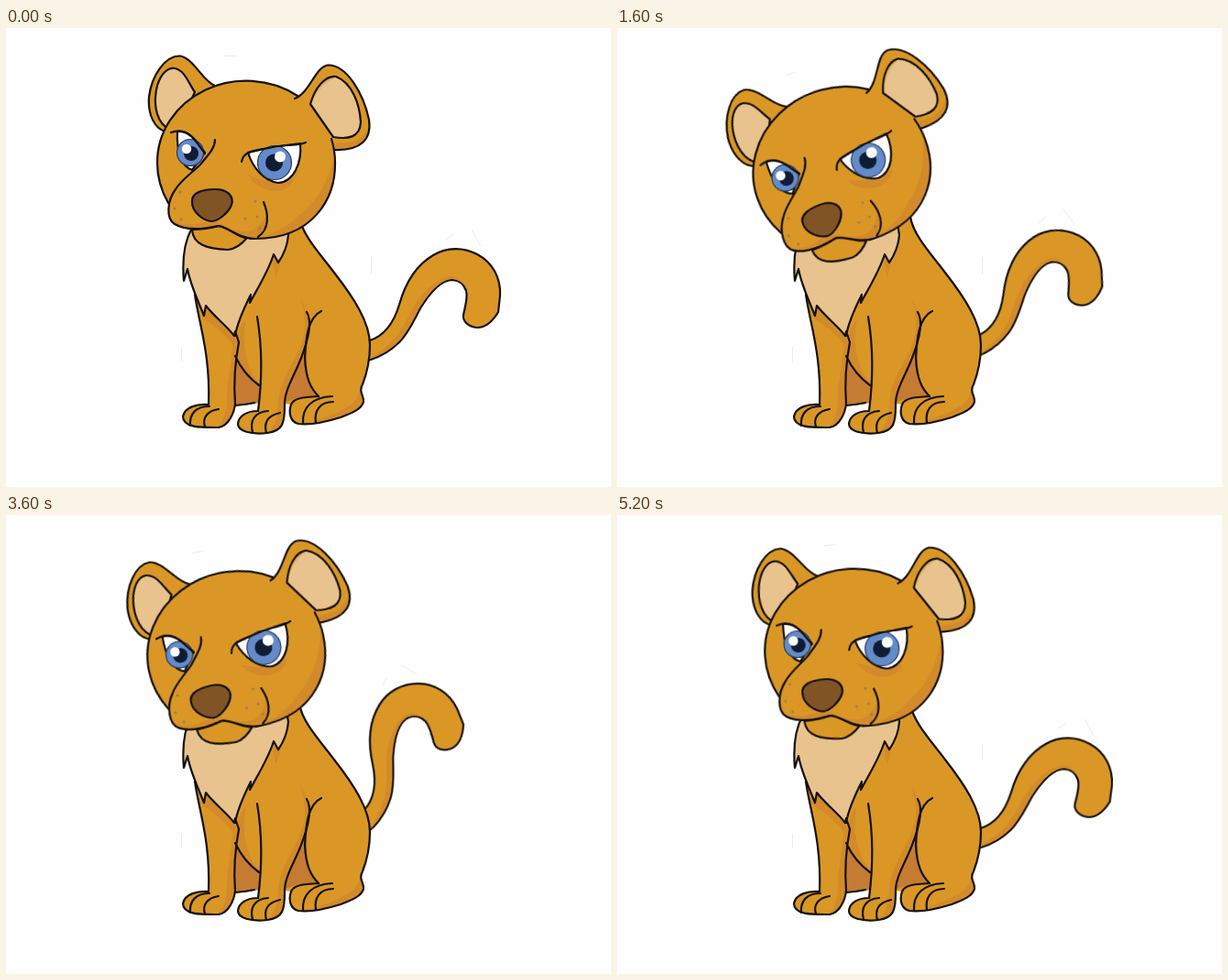
Write an HTML page that moves like this. It is 660x501 px and loops after 5400 ms.

```html
<!DOCTYPE html>
<html lang="en">
<head>
<meta charset="utf-8">
<title>Lion cub</title>
<style>
  html, body { margin: 0; width: 100%; height: 100%; overflow: hidden; background: #fefefe; }
  svg { display: block; width: 660px; height: 501px; }
  .line, .edge { stroke: #14110c; stroke-width: 2.2; stroke-linecap: round; stroke-linejoin: round; }
  .line { fill: none; }
  .coat { fill: #da9726; }
  .shade { fill: #d38a2a; }
  .deep { fill: #c67b33; }
  .cream { fill: #e8c38d; }
  .white { fill: #fefefe; }
  .iris { fill: #648bc9; stroke: #253a5c; stroke-width: 1.2; }
  .pupil { fill: #101c34; }
  .scrap { fill: none; stroke: #e2e2e2; stroke-width: .7; }
  #head { transform-origin: 275px 202px; animation: nod 5400ms infinite; }
  #tail { transform-origin: 356.5px 344.6px; animation: wag 5400ms infinite; }

  /* The pose changes every 200 ms, so each stretch is stepped. */
  @keyframes nod {
    0%      { transform: rotate(0deg);      animation-timing-function: steps(6); }
    22.222% { transform: rotate(-14.1deg);  animation-timing-function: steps(3); }
    33.333% { transform: rotate(-21.4deg);  animation-timing-function: steps(2); }
    40.74%  { transform: rotate(-18.9deg);  animation-timing-function: steps(4); }
    55.555% { transform: rotate(-14.3deg);  animation-timing-function: steps(3); }
    66.666% { transform: rotate(-11.8deg);  animation-timing-function: steps(4); }
    81.481% { transform: rotate(-7.3deg);   animation-timing-function: steps(4); }
    96.296% { transform: rotate(-3.9deg);   animation-timing-function: steps(1); }
    100%    { transform: rotate(0deg); }
  }
  @keyframes wag {
    0%      { transform: rotate(0deg);      animation-timing-function: steps(6); }
    22.222% { transform: rotate(-4.6deg);   animation-timing-function: steps(5); }
    40.74%  { transform: rotate(-15.6deg);  animation-timing-function: steps(1); }
    44.444% { transform: rotate(-17.6deg);  animation-timing-function: steps(3); }
    55.555% { transform: rotate(-30.4deg);  animation-timing-function: steps(1); }
    59.259% { transform: rotate(-33deg);    animation-timing-function: steps(2); }
    66.666% { transform: rotate(-28.3deg);  animation-timing-function: steps(4); }
    81.481% { transform: rotate(-.3deg);    animation-timing-function: steps(2); }
    88.888%, 96.296% { transform: rotate(1deg); animation-timing-function: steps(1); }
    100%    { transform: rotate(0deg); }
  }
</style>
</head>
<body>
<svg viewBox="0 0 660 501">
  <path class="scrap" d="M191.5 348V364M398.5 250V268"/>

  <g id="tail">
    <path class="scrap" d="M508 220L518 238M479 231L488 225"/>
    <path class="coat edge" d="M380 346L397 341C412 336 423 322 429 302C436 277 449 258 466 248C481 239 499 239 514 247C531 256 540 273 539 292L537 310C531 320 523 327 514 327C504 326 498 320 499 313C501 303 504 295 502 287C499 278 493 275 486 275C472 276 460 293 452 306C444 321 439 333 429 343C421 351 410 358 398 362L380 366"/>
    <path class="shade" d="M399 358C419 348 430 333 439 315C449 294 464 277 483 271C491 270 497 273 500 281C496 276 491 274 486 274C472 275 459 292 451 305C443 320 438 332 428 342C420 350 410 357 399 360Z"/>
  </g>

  <g id="body">
    <path class="coat" d="M206 220L320 206C323 226 343 247 358 267C379 294 397 321 397 346C397 362 394 376 389 389C384 397 391 402 390 408C388 416 378 420 365 425C349 430 333 434 319 432C310 430 308 420 311 411L304 410C303 431 302 440 285 442C267 444 253 440 253 432C254 423 263 418 275 418L276 409L250 412C247 424 244 436 232 436C215 437 193 437 193 424C195 414 208 410 221 411C223 370 214 330 206 291Z"/>
    <path class="deep" d="M250 359C257 373 265 382 278 390L276 409Q262 413 249 412Q249 385 250 359Z"/>
    <path class="deep" d="M329 342C327 368 328 390 341 402L320 403L305 408C305 397 318 375 329 342Z"/>
    <path class="shade" d="M262 318C251 330 250 346 251 359C257 373 265 382 278 390C262 372 256 345 262 318Z"/>
    <path class="shade" d="M320 293C326 304 330 313 331 322C330 344 307 386 304 410C304 426 302 440 285 442Q297 432 297 409C298 380 323 357 326 330Q327 309 320 293Z"/>
    <path class="shade" d="M252 342C248 370 249 390 250 411C247 426 243 436 231 436Q241 425 241 405C242 378 247 365 248 338Z"/>
    <path class="shade" d="M291 250L299 258L295 272Q292 267 291 250Z"/>
    <path class="shade" d="M389 389C384 397 391 402 390 408C388 416 378 420 365 425Q341 432 319 432Q350 427 372 414Q386 407 386 392Z"/>
    <path class="shade" d="M208 294L250 338L249 347Q231 326 216 318Q212 314 208 294Z"/>

    <path class="cream" d="M206 212L202 220C194 235 192 253 194 276L198 263C201 280 208 294 216 314L218 303C228 316 240 324 250 336C252 323 259 307 267 291L266 300C275 283 286 266 292 247L297 256C304 246 307 238 308 226L306 212Z"/>
    <path class="line" d="M202 220C194 235 192 253 194 276L198 263C201 280 208 294 216 314L218 303C228 316 240 324 249 336L250 331L254 343M250 336C252 323 259 307 267 291L266 300C275 283 286 266 292 247L297 256C304 246 307 238 308 226L306 214"/>

    <path class="line" d="M320 206C323 226 343 247 358 267C379 294 397 321 397 346C397 362 394 376 389 389C384 397 391 402 390 408C388 416 378 420 365 425C349 430 333 434 319 432C310 430 308 420 311 411C314 404 323 403 341 402"/>
    <path class="line" d="M344 309C329 316 327 340 326 360C327 382 332 393 341 402"/>
    <path class="line" d="M328 310C335 321 329 342 322 360C315 379 303 396 304 412C304 431 302 440 285 442C267 444 253 440 253 432C254 423 263 418 275 418C278 395 281 357 274 315"/>
    <path class="line" d="M206 291C211 325 223 356 221 411C208 410 195 414 193 424C193 437 215 436 232 436C243 434 249 420 250 410C248 386 250 364 254 343M250 358C257 373 265 382 276 390M250 412Q262 411 271 409"/>
    <path class="line" d="M222 413C207 413 200 421 201 434M232 416C219 418 214 426 217 435"/>
    <path class="line" d="M286 418C270 419 266 430 269 441M299 420C285 423 281 431 284 442"/>
    <path class="line" d="M356 402C334 403 323 414 324 431M357 408C342 408 336 418 338 431"/>
  </g>

  <g id="head">
    <path class="scrap" d="M237 30.500H250"/>

    <path class="coat edge" d="M228 63C214 58 206 34 190 30.500C174 30 159 51 156 75C154.500 94 162 111 175 113L206 100Z"/>
    <path class="cream edge" d="M174 108C162 98 161 78 165 63C169 50 176 43 184 44C195 46 199 60 206 70L190 104Z"/>

    <path class="coat" d="M177 191C169 177 165 162 165 147A97 89 0 0 1 359 147C359.500 186 335 230 272 230C254 230 244 218 232 216C222 218 216 220 205 219C190 219 176 212 177 198Z"/>
    <path class="shade" d="M358 140C362 181 341 230 272 230Q303 222 318 206C341 188 351 168 358 140Z"/>
    <path class="shade" d="M264 160Q288 172 315 165Q308 178 293 178Q274 177 264 160Z"/>
    <path class="shade" d="M178 206Q189 217 207 214Q225 209 234 213Q251 224 267 222Q278 216 284 205Q286 220 274 229Q257 231 244 221Q234 214 221 219Q183 223 178 206Z"/>

    <path class="coat" d="M315 77C332 70 337 43 351 40.500C372 40 390 72 396 100C399 121 388 134 358 133L350 115L331 90Z"/>
    <path class="shade" d="M359 125Q385 128 394 111Q394 132 358 133Z"/>
    <path fill="#dfae66" d="M332 83C337 65 348 52 360 53L346 75Z"/>
    <path class="cream" d="M333 84C338 71 346 59 360 54C378 61 386 84 387 103C386 119 374 122 357 119Z"/>
    <path class="line" d="M315 77C332 70 337 43 351 40.500C372 40 390 72 396 100C399 121 388 134 358 133"/>
    <path class="line" d="M332 83C337 65 348 52 360 53C378 60 386 84 387 103C386 119 374 122 357 119Z"/>

    <path class="line" d="M177 191C169 177 165 162 165 147A97 89 0 0 1 318 74M355 121Q359 134 359 147C359.500 186 335 230 272 230"/>

    <path class="coat edge" d="M203 220C204 237 220 241 242 242C252 241 258 235 263 229C254 230 244 218 232 216C222 219 213 220 203 220Z"/>

    <path class="white edge" d="M187 113C199 111 209 124 217 136L203 155C191 151 186 134 187 113Z"/>
    <circle class="iris" cx="201" cy="136" r="14.500"/>
    <circle class="pupil" cx="202" cy="137" r="8"/>
    <circle class="white" cx="197" cy="132" r="5.200"/>
    <path class="line" d="M180 114C199 107 207 124 217 137M228 122C228 132 219 140 212 149C202 159 191 166 185 176C176 188 174 208 184 214C197 222 218 219 232 216C244 218 254 230 272 230"/>

    <path class="white edge" d="M264 136Q293 129 321 126C323 147 314 168 297 169C281 167 269 152 264 136Z"/>
    <circle class="iris" cx="293" cy="147" r="18.500"/>
    <circle class="pupil" cx="292.500" cy="147" r="9.500"/>
    <circle class="white" cx="299" cy="140.500" r="6"/>
    <path class="line" d="M257 146C259 133 273 134 291 130C306 127 318 129 327 125"/>

    <path class="edge" fill="#805425" d="M203 190C202 179 216 176 228 176C242 176 249 184 246 193C243 201 232 211 224 211C215 210 203 201 203 190Z"/>
    <path class="line" d="M281 190C287 204 287 220 275 228"/>
    <g fill="#a17d49">
      <circle cx="190" cy="179" r="1.500"/>
      <circle cx="184" cy="197" r="1.500"/>
      <circle cx="191" cy="209" r="1.500"/>
      <circle cx="272" cy="189" r="1.500"/>
      <circle cx="261" cy="208" r="1.500"/>
      <circle cx="274" cy="206" r="1.500"/>
      <circle cx="277" cy="218" r="1.500"/>
    </g>
  </g>
</svg>
</body>
</html>
```
